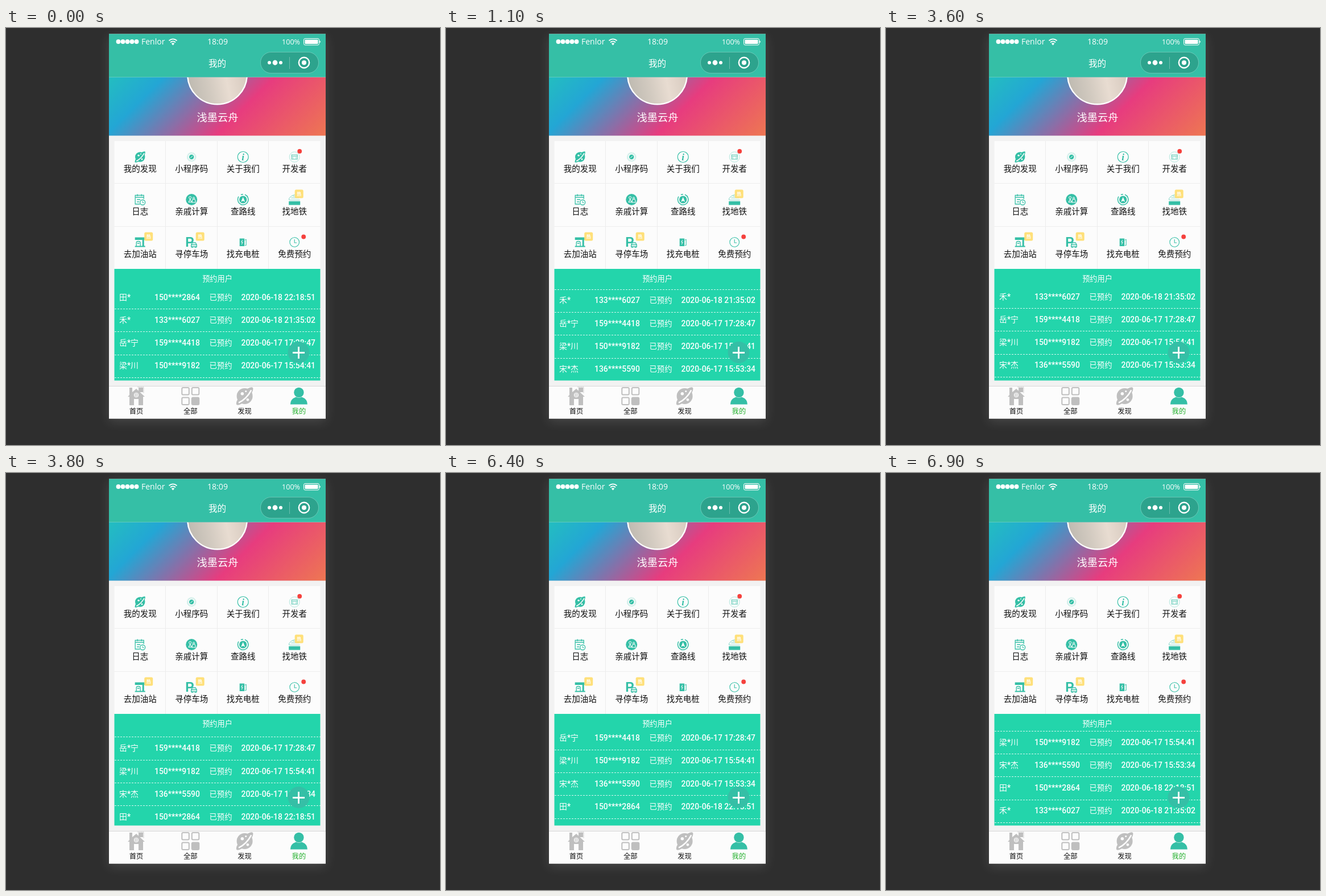
An HTML page that plays this animation: 763 by 734 pixels, repeating every 8000 ms.

```html
<!DOCTYPE html>
<html lang="zh-CN">
<head>
<meta charset="utf-8">
<style>
html, body { margin: 0; width: 100%; height: 100%; overflow: hidden; background: #2e2e2e; }
svg { display: block; width: 100%; height: 100%; font-family: "Open Sans", "Noto Sans CJK SC", "Noto Sans CJK", sans-serif; }
.phone { filter: drop-shadow(0 5px 10px rgba(255, 255, 255, .13)); }
.mid { text-anchor: middle; }
.end { text-anchor: end; }
.line { fill: none; stroke: #35bfa6; }
.cut { fill: none; stroke: #fcfcfc; }
#rows { font: 500 13.9px Roboto, "Noto Sans CJK SC", "Noto Sans CJK", sans-serif; fill: #fff; }
#rows path { stroke: #fff; stroke-opacity: .8; stroke-dasharray: 3 2; shape-rendering: crispEdges; }
</style>
</head>
<body>
<svg viewBox="0 0 763 734">
  <defs>
    <linearGradient id="sky" gradientUnits="userSpaceOnUse" x1="0" y1="171" x2="290.5" y2="461.5">
      <stop offset="0" stop-color="#23d5ab"/><stop offset=".333" stop-color="#23a6d5"/>
      <stop offset=".667" stop-color="#e73c7e"/><stop offset="1" stop-color="#ee7752"/>
    </linearGradient>
    <linearGradient id="face" x1="0" x2="1" y1=".7" y2=".5">
      <stop offset="0" stop-color="#bdb9b0"/><stop offset=".35" stop-color="#d2cac0"/>
      <stop offset=".65" stop-color="#e8dcd1"/><stop offset="1" stop-color="#d6c9be"/>
    </linearGradient>
    <clipPath id="below"><rect x="181" y="86.5" width="381" height="103"/></clipPath>
    <clipPath id="list"><rect x="190" y="454" width="363" height="163"/></clipPath>
    <g id="planet">
      <circle r="13.2"/>
      <path d="M4-12Q13-17 14-13Q14-8 10-3ZM-4 12Q-13 17-14 13Q-14 8-10 3Z"/>
      <path class="cut" stroke-width="2.4" d="M-10 11Q3 5 11-10"/>
      <g fill="#fcfcfc"><circle cx="-4" cy="-4" r="2.6"/><circle cx="2" cy="-8" r="1.5"/><circle cx="5" cy="6" r="2.2"/></g>
    </g>
    <g id="badge">
      <rect x="-7.5" y="-7.5" width="15" height="15" rx="2.5" fill="#ffe07a"/>
      <text class="mid" y="3" font-size="8" font-weight="700" fill="#fff">热</text>
    </g>
  </defs>

  <rect class="phone" x="181" y="10.5" width="381" height="677" fill="#f2f2f2"/>
  <g clip-path="url(#below)">
    <rect x="181" y="86" width="381" height="104" fill="url(#sky)"/>
    <circle cx="371.5" cy="82" r="52.3" fill="url(#face)" stroke="#fff" stroke-width="2.4"/>
  </g>
  <text class="mid" x="372" y="164" font-size="18.2" fill="#fff">浅墨云舟</text>

  <!-- status and title bars -->
  <rect x="181" y="10.5" width="381" height="76" fill="#35bfa6"/>
  <g fill="#fff">
    <path d="M197.5 24h33" stroke="#fff" stroke-width="7.8" stroke-linecap="round" stroke-dasharray="0 8"/>
    <text x="238" y="28.5" font-size="14">Fenlor</text>
    <text class="mid" x="372" y="29" font-size="14.1">18:09</text>
    <text class="end" x="517" y="29" font-size="12.6">100%</text>
    <path d="M286.5 22.3Q293.5 16.5 300.5 22.3M289 25.3Q293.5 21.5 298 25.3" fill="none" stroke="#fff" stroke-width="1.8"/>
    <path d="M290.8 27.3Q293.5 25 296.2 27.3L293.5 30.5Z"/>
    <rect x="523.5" y="18.5" width="27" height="11.5" rx="2.5" fill="none" stroke="#fff"/>
    <rect x="525.5" y="20.5" width="23" height="7.5" rx="1"/>
    <path d="M551.5 22q3 2.2 0 4.5z"/>
    <text class="mid" x="371.5" y="67.5" font-size="15.6" font-weight="500">我的</text>
    <rect x="447.5" y="42.5" width="102" height="37" rx="18.5" fill="#000" fill-opacity=".15" stroke="#fff" stroke-opacity=".25"/>
    <circle cx="463" cy="61" r="3"/><circle cx="473" cy="61" r="4.4"/><circle cx="483" cy="61" r="3"/>
    <path d="M498.5 51v21" stroke="#fff" stroke-opacity=".3"/>
    <circle cx="524" cy="61" r="9.2" fill="none" stroke="#fff" stroke-width="2.4"/><circle cx="524" cy="61" r="4"/>
  </g>

  <!-- menu -->
  <rect x="190.5" y="199" width="362" height="225" fill="#fcfcfc"/>
  <path d="M190.5 273.5h362M190.5 349.5h362M280.5 199v225M371.5 199v225M461.5 199v225" stroke="#ededed"/>
  <g id="menu"></g>

  <!-- bookings -->
  <rect x="190.5" y="424" width="362" height="196.5" fill="#23d5ab"/>
  <text class="mid" x="371.5" y="446" font-size="13.2" fill="#fff">预约用户</text>
  <g clip-path="url(#list)"><g id="rows"></g></g>
  <circle cx="514.5" cy="571" r="19" fill="#35bfa6"/>
  <path d="M504 571.5h21M514.5 561v21" stroke="#fff" stroke-width="2.8"/>

  <!-- tab bar -->
  <rect x="181" y="630" width="381" height="57.5" fill="#fcfcfc"/>
  <path d="M181 630.5h381" stroke="#d8d8d8"/>
  <g id="tabs"></g>
</svg>
<script>
const $ = id => document.getElementById(id);
const badge = x => `<use href="#badge" x="${x}" y="-10"/>`;
const dot = (x, y) => `<circle cx="${x}" cy="${y}" r="3.9" fill="#f5413d"/>`;

// Each icon is drawn around its own centre.
const menu = [
  ['我的发现', '<use href="#planet" transform="scale(.66)"/>'],
  ['小程序码', `<circle class="line" r="7" stroke-width="2.6" stroke-dasharray="1 1.2" opacity=".4"/>
    <circle r="4.2"/><path class="cut" d="M-2 2L2-2"/>`],
  ['关于我们', `<circle class="line" r="9.5" stroke-width="1.2"/>
    <text class="mid" y="5.5" font-family="Liberation Serif, serif" font-size="17" font-style="italic" font-weight="700">i</text>`],
  ['开发者', `<circle class="line" r="9" opacity=".35"/><rect class="line" x="-5" y="-4" width="10" height="8" opacity=".8"/>
    <path class="line" d="M-5-1.5h10M-2 0l-1.5 1.5L-2 3M2 0l1.5 1.5L2 3" stroke-width=".8"/>${dot(9, -10)}`],
  ['日志', `<path class="line" stroke-width="1.3" d="M0 8H-8.5V-7.5H6.5V-1M-8.5-4H6.5M-4.5-9.5v3.5M2.5-9.5v3.5M-5.5 0h6M-5.5 4h4"/>
    <circle class="line" cx="4.5" cy="5" r="4.5" stroke-width="1.3"/><path class="line" d="M4.5 2.5V5.5H7"/>`],
  ['亲戚计算', `<circle r="10"/><path class="cut" stroke-width="1.1" d="M-5 4.5L-2.5-1L0 4.5ZM1 5q0-6 3-6t3 6z"/>
    <circle class="cut" cx="-2.5" cy="-3.5" r="2"/><circle class="cut" cx="3.8" cy="-2.5" r="1.6"/>`],
  ['查路线', `<circle class="line" r="9.3" stroke-width="1.5" stroke-dasharray="46 5 4 3.5" transform="rotate(-70)"/>
    <circle r="6.6"/><path fill="#fcfcfc" d="M0-4.5L3.5 4L0 2.2L-3.5 4Z"/>`],
  ['找地铁', `<rect x="-10" y="3" width="20" height="6.5"/>
    <path class="line" opacity=".6" d="M-9.5 1V-2Q-5-9 5-9M-9 1H9.5M-6-3H8M-3-6H8"/>${badge(8)}`],
  ['去加油站', `<path d="M-9-8.5H8V-4H-9ZM4-4H7V8.5H4ZM-9 6.5H9V8.5H-9Z"/>
    <path class="line" stroke-width="1.3" d="M-6.5 7V1Q-6.5-1.5-3-1.5T.5 1V7M-5 2H-1"/>${badge(15)}`],
  ['寻停车场', `<text x="-11" y="8" font-size="23" font-weight="700" font-family="Liberation Sans, sans-serif">P</text>
    <path class="line" stroke-width="1.3" d="M-.5 8V4.5L1.5 1H7L9 4.5V8ZM-.5 4.5H9"/>
    <path d="M0 8h2.5v1.8H0ZM6 8h2.5v1.8H6Z"/>${badge(15)}`],
  ['找充电桩', `<path d="M-6-6.5H2.5V7H-6Z"/><path class="cut" d="M-1-4L-3 0H-.5L-2.5 4"/>
    <path class="line" d="M3-3.5L5.5-5V5.5H3.5"/>`],
  ['免费预约', `<circle class="line" r="8.3" stroke-width="1.1"/><path class="line" stroke-width="1.1" d="M0-5V1H4"/>${dot(16, -9.5)}`],
];
$('menu').innerHTML = menu.map(([name, icon], i) => {
  const x = 235.7 + i % 4 * 90.5, y = Math.floor(i / 4) * 75;
  return `<g transform="translate(${x} ${y})"><g fill="#35bfa6" transform="translate(0 227)">${icon}</g>
    <text class="mid" y="253" font-size="14.5" fill="#111">${name}</text></g>`;
}).join('');

const tabs = [
  ['首页', `<path d="M-15 1L-12-2V-15H-7V-7L0-13L15 1H12V16H-12V1Z"/>
    <path fill="none" stroke="#bfbfbf" stroke-dasharray="2 1" d="M2.5-16H13V-5"/><rect x="4" y="-15" width="8" height="8"/>
    <circle class="cut" r="3.5" cy="-2" stroke-width="1.2"/><path class="cut" d="M0-5V1M-3-2H3"/>
    <rect x="-4" y="5" width="8" height="11" fill="#fcfcfc"/>`],
  ['全部', [[-15, -15], [2.5, -15], [-15, 2.5], [2.5, 2.5]].map(([x, y], i) =>
    `<rect x="${x}" y="${y}" width="12.5" height="12.5" rx="2" stroke="#bfbfbf" stroke-width="2" fill="${i < 3 ? 'none' : '#bfbfbf'}"/>`).join('')],
  ['发现', '<use href="#planet" transform="scale(1.06)"/>'],
  ['我的', '<circle cy="-6.5" r="8.7"/><path d="M-15 14.5Q-15 5-5 1.5Q0 4 5 1.5Q15 5 15 14.5Z"/>'],
];
$('tabs').innerHTML = tabs.map(([name, icon], i) =>
  `<g transform="translate(${229 + i * 95.3} 648)" fill="${i < 3 ? '#bfbfbf' : '#35bfa6'}">${icon}
    <text class="mid" y="31.3" font-size="12.3" fill="${i < 3 ? '#111' : '#22b02c'}">${name}</text></g>`).join('');

const people = [
  ['田*', '150****2864', '2020-06-18 22:18:51'],
  ['禾*', '133****6027', '2020-06-18 21:35:02'],
  ['岳*宁', '159****4418', '2020-06-17 17:28:47'],
  ['梁*川', '150****9182', '2020-06-17 15:54:41'],
  ['宋*杰', '136****5590', '2020-06-17 15:53:34'],
];
const pitch = 40.3;
$('rows').innerHTML = Array.from({ length: 8 }, (_, i) => {
  const [name, phone, date] = people[i % people.length];
  return `<g transform="translate(0 ${i * pitch})">
    <text x="199" y="478.5">${name}</text><text class="mid" x="301" y="478.5">${phone}</text>
    <text class="mid" x="377.5" y="478.5" font-size="13.3">已预约</text><text class="end" x="544" y="478.5">${date}</text>
    <path d="M190.5 494.5h362"/></g>`;
}).join('');

// The CSS "ease" curve, solved by bisection.
function ease(x) {
  if (x <= 0) return 0;
  if (x >= 1) return 1;
  let lo = 0, hi = 1, s;
  for (let i = 0; i < 20; i++) {
    s = (lo + hi) / 2;
    if (.75 * s * (1 - s) + s ** 3 < x) lo = s; else hi = s;
  }
  return .3 * s * (1 - s) ** 2 + 3 * s * s * (1 - s) + s ** 3;
}

const starts = [822, 3581, 6326];
const begin = performance.now();
function draw() {
  const t = Math.floor((performance.now() - begin) % 8000 / 100) * 100;
  const steps = starts.reduce((sum, start) => sum + ease((t - start) / 500), 0);
  $('rows').setAttribute('transform', `translate(0 ${-pitch * steps})`);
  requestAnimationFrame(draw);
}
draw();
</script>
</body>
</html>
```
